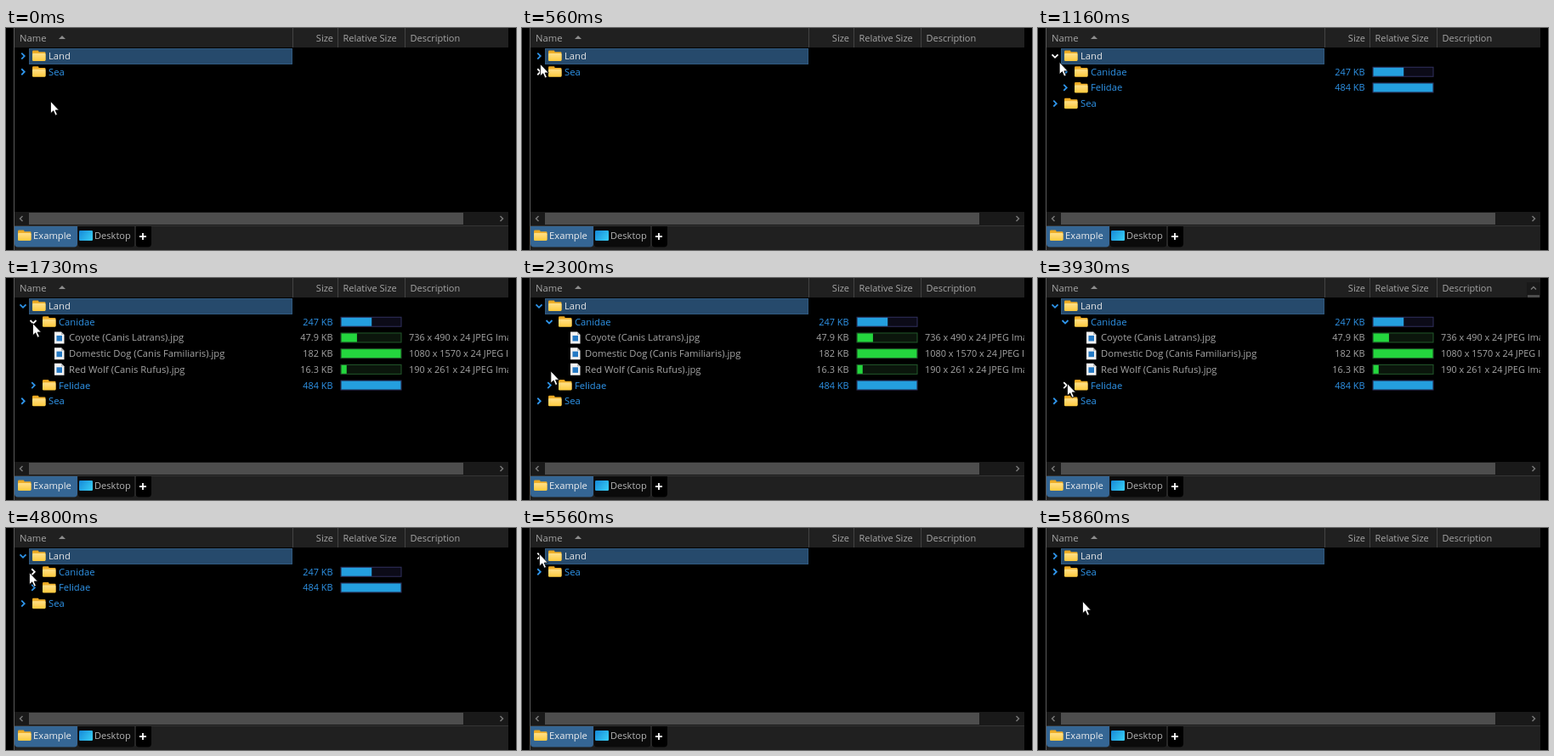
An HTML page with a canvas that plays this animation: 600x262 px, repeating every 6.1 s.

```html
<!DOCTYPE html>
<html lang="en">
<head>
<meta charset="utf-8">
<title>File tree</title>
<style>
html, body { margin: 0; height: 100%; overflow: hidden; background: #000; }
canvas { display: block; width: 600px; height: 262px; }
</style>
</head>
<body>
<canvas id="stage"></canvas>
<script>
const LOOP = 6100, STEP = 100 / 3, PITCH = 18.7, TOP = 23.7;
const BLUE = '#2f95ea', GREY = '#a6a6a6';
const canvas = document.getElementById('stage');
const ctx = canvas.getContext('2d');
const dpr = window.devicePixelRatio || 1;
canvas.width = 600 * dpr;
canvas.height = 262 * dpr;
ctx.scale(dpr, dpr);

// name, KB, dimensions
const dogs = [
  ['Coyote (Canis Latrans).jpg', 47.9, '736 x 490'],
  ['Domestic Dog (Canis Familiaris).jpg', 182, '1080 x 1570'],
  ['Red Wolf (Canis Rufus).jpg', 16.3, '190 x 261']
];
const cats = [
  ['Andean Mountain Cat (Leopardus Jacobita).jpg', 16.8, '283 x 232'],
  ['Domestic Cat (Felis Catus).jpg', 52.1, '852 x 480'],
  ['European Wildcat (Felis Silvestris).jpg', 182, '1080 x 1570'],
  ['Pampas Cat (Leopardus Colocola).jpg', 137, '415 x 252'],
  ['Sand Cat (Felis Margarita).jpg', 96.1, '620 x 701']
];

// pointer stops: time, x, y, slow-down (smooth when absent)
const stops = [
  [0, 52, 86], [300, 52, 86], [566, 21, 42, .35], [733, 20, 30, .9],
  [1030, 20, 30], [1333, 31, 53], [1900, 31, 53], [2466, 34, 124],
  [3933, 34, 124], [4500, 26, 50], [4533, 26, 50], [4566, 27, 52],
  [4900, 27, 52], [5200, 20, 30], [5560, 20, 30], [5860, 52, 86], [LOOP, 52, 86]
];

function pointerAt(t) {
  t = Math.floor((t + 7) / STEP) * STEP;
  const i = Math.max(1, stops.findIndex(s => s[0] >= t));
  const a = stops[i - 1], b = stops[i], k = b[3];
  const u = Math.min(1, (t - a[0]) / (b[0] - a[0]));
  const e = k === undefined ? u * u * (3 - 2 * u) : u * (1 + k - k * u);
  return { x: a[1] + (b[1] - a[1]) * e, y: a[2] + (b[2] - a[2]) * e };
}

function treeAt(t) {
  const land = t >= 860 && t < 5560;
  const dogsOpen = t >= 1730 && t < 4800;
  const catsOpen = t >= 2630 && t < 3930;
  const file = ([name, kb, dims]) => ({ name, kb, dims, level: 2, max: 182 });
  const rows = [{ name: 'Land', level: 0, open: land }];
  if (land) {
    rows.push({ name: 'Canidae', level: 1, open: dogsOpen, kb: 247, max: 484 });
    if (dogsOpen) rows.push(...dogs.map(file));
    rows.push({ name: 'Felidae', level: 1, open: catsOpen, kb: 484, max: 484 });
    if (catsOpen) rows.push(...cats.map(file));
  }
  rows.push({ name: 'Sea', level: 0, open: false });
  return rows;
}

function box(x, y, w, h, color) {
  ctx.fillStyle = color;
  ctx.fillRect(x, y, w, h);
}

function round(x, y, w, h, r, color) {
  ctx.fillStyle = color;
  ctx.beginPath();
  ctx.roundRect(x, y, w, h, r);
  ctx.fill();
}

function text(s, x, y, color, size = 11.25, align = 'left') {
  ctx.font = `${size}px "Open Sans", "Noto Sans", sans-serif`;
  ctx.textAlign = align;
  ctx.fillStyle = color;
  ctx.fillText(s, x, y);
}

function chevron(x, y, turns, color, r = 3.5, width = 1.8) {
  ctx.save();
  ctx.translate(x, y);
  ctx.rotate(turns * Math.PI / 2);
  ctx.beginPath();
  ctx.moveTo(-r / 2, -r);
  ctx.lineTo(r / 2, 0);
  ctx.lineTo(-r / 2, r);
  ctx.strokeStyle = color;
  ctx.lineWidth = width;
  ctx.stroke();
  ctx.restore();
}

function polygon(points, color) {
  ctx.beginPath();
  points.forEach(([x, y]) => ctx.lineTo(x, y));
  ctx.closePath();
  ctx.fillStyle = color;
  ctx.fill();
}

function folder(x, y) {
  round(x, y - 6.5, 7.5, 6, 1.2, '#e9a51f');
  round(x, y - 4.8, 15.5, 10, 1.2, '#f0b02a');
  const g = ctx.createLinearGradient(0, y - 3, 0, y + 6);
  g.addColorStop(0, '#ffe08a');
  g.addColorStop(1, '#ffca3c');
  round(x, y - 3, 15.5, 9, 1.2, g);
}

function page(x, y) {
  polygon([[x, y - 7], [x + 8, y - 7], [x + 11.5, y - 3.5], [x + 11.5, y + 7], [x, y + 7]], '#f2f2f2');
  polygon([[x + 8, y - 7], [x + 11.5, y - 3.5], [x + 8, y - 3.5]], '#b5b5b5');
  box(x + 2.5, y - 2.5, 6.5, 6.5, '#2479c4');
}

function sizeBar(row, y) {
  const leaf = row.level === 2;
  box(393.5, y - 6, 72, 12, leaf ? '#22592b' : '#30305f');
  box(394.5, y - 5, 70, 10, leaf ? '#0b160c' : '#0c0b18');
  box(394.5, y - 5, 70 * row.kb / row.max, 10, leaf ? '#24d63e' : '#249fdf');
}

function drawRow(row, i, pointer) {
  const y = TOP + PITCH * (i + .5), shift = 12 * row.level, leaf = row.level === 2;
  if (i === 0) {
    box(27, 24, 310, 19, '#31597f');
    box(28, 25, 308, 17, '#264a6c');
  }
  if (leaf) {
    page(57, y);
  } else {
    const cx = 20 + shift;
    const over = Math.floor((pointer.y - 23.2) / PITCH) === i && Math.abs(pointer.x - cx) < 7;
    chevron(cx, y, row.open ? 1 : 0, over ? '#fff' : BLUE);
    folder(31 + shift, y);
  }
  const color = leaf ? GREY : BLUE;
  text(row.name, 50 + shift, y + 4, i === 0 ? '#e4e4e4' : color);
  if (row.kb) {
    text(row.kb + ' KB', 384.5, y + 4, color, 10.9, 'right');
    sizeBar(row, y);
  }
  if (leaf) text(row.dims + ' x 24 JPEG Image', 474, y + 4, GREY, 10.9);
}

function header() {
  box(10, 0, 581, 23, '#202020');
  for (const x of [337, 390, 469]) box(x, 0, 1, 23, '#434343');
  text('Name', 16, 16, GREY);
  polygon([[62, 13], [66, 9], [70, 13]], '#8c8c8c');
  text('Size', 385, 16, GREY, 11, 'right');
  text('Relative Size', 396.5, 16, GREY, 11);
  text('Description', 475.5, 16, GREY, 11);
}

function scrollbars(tall, right, t) {
  box(10, 217, 581, 16, '#191919');
  box(27, 218, tall ? 482 : 511, 14, '#4d4d4d');
  chevron(18, 225, 2, '#777', 3, 1.5);
  chevron(right - 8, 225, 0, '#777', 3, 1.5);
  if (tall) {
    box(575, 0, 16, 217, '#191919');
    box(576, 20, 14, 152, '#4d4d4d');
    chevron(583, 209, 1, '#777', 3, 1.5);
  } else if (t >= 3930 && t < 3960) {
    box(575, 5, 16, 18, '#191919');
    box(576, 20, 14, 3, '#4d4d4d');
  } else {
    return;
  }
  chevron(583, 12, 3, '#777', 3, 1.5);
}

function tabs() {
  box(10, 233, 581, 29, '#202020');
  box(10, 233, 581, 1, '#343434');
  round(10, 234, 74, 24.5, [0, 0, 4, 4], '#356694');
  round(84.5, 234, 67, 24.5, [0, 0, 4, 4], '#0b0b0b');
  round(152.5, 234, 18.5, 24.5, [0, 0, 4, 4], '#000');
  box(151.5, 234, 1, 23, '#3a3a3a');
  folder(14, 245);
  text('Example', 32, 249, '#eee');
  const g = ctx.createLinearGradient(86, 239, 102, 251);
  g.addColorStop(0, '#1689d8');
  g.addColorStop(1, '#39d0f5');
  round(86, 239, 16, 12, 1.2, g);
  text('Desktop', 104, 249, '#b4b4b4', 11.1);
  box(157, 245.2, 8, 1.8, '#fff');
  box(160.1, 242, 1.8, 8, '#fff');
}

function arrow({ x, y }) {
  ctx.save();
  ctx.translate(x, y);
  polygon([[.5, .5], [.5, 14.8], [3.8, 11.8], [6.1, 17.2], [8.4, 16.2], [6.1, 11], [10.4, 11]], '#fff');
  ctx.strokeStyle = '#000';
  ctx.lineWidth = .8;
  ctx.stroke();
  ctx.restore();
}

function draw(now) {
  const t = now % LOOP, pointer = pointerAt(t), rows = treeAt(t);
  const tall = rows.length > 10, right = tall ? 575 : 591;
  box(0, 0, 600, 262, '#000');
  ctx.save();
  ctx.beginPath();
  ctx.rect(10, 23, right - 10, 194);
  ctx.clip();
  rows.forEach((row, i) => drawRow(row, i, pointer));
  ctx.restore();
  header();
  scrollbars(tall, right, t);
  tabs();
  box(9, 0, 1, 262, '#5a5a5a');
  arrow(pointer);
}

let start;
function tick(now) {
  start ??= now;
  draw(now - start);
  requestAnimationFrame(tick);
}
draw(0);
requestAnimationFrame(tick);
</script>
</body>
</html>
```
